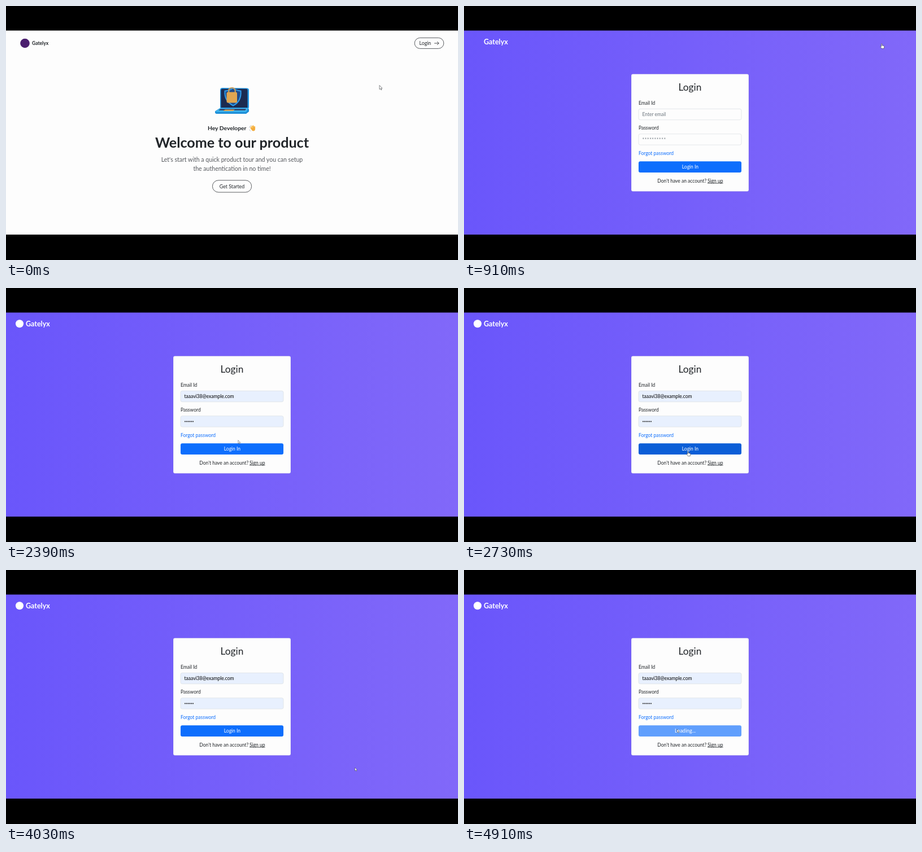
An HTML page for the animation above (5670 ms loop, 800x450 px).

```html
<!DOCTYPE html>
<html lang="en">
<head>
<meta charset="utf-8">
<title>Login demo</title>
<style>
  html, body { margin: 0; height: 100%; overflow: hidden; background: #000; }
  svg { display: block; width: 100vw; height: 100vh; font: 8.5px Lato, "Open Sans", sans-serif; fill: #212529; }
  .bold { font-weight: 700; }
  .mid { text-anchor: middle; }
  .lead { font-size: 10.55px; fill: #55585d; }
  .pill { fill: #fdfdfd; stroke: #33363a; stroke-width: .8; }
  .field { fill: #fdfdfd; stroke: #dee2e6; stroke-width: .8; }
  .hint { fill: #6c757d; }
  .white { fill: #fff; }
  .line { fill: none; stroke-linecap: round; stroke-linejoin: round; }
</style>
</head>
<body>
<svg viewBox="0 0 800 450">
  <defs>
    <linearGradient id="violet">
      <stop stop-color="#6a56fb"/>
      <stop offset="1" stop-color="#8168f9"/>
    </linearGradient>
  </defs>

  <g id="home">
    <rect y="43.5" width="800" height="361.5" fill="#fdfdfd"/>
    <circle cx="33.5" cy="66" r="8.3" fill="#4b1f6f"/>
    <text class="bold" x="46" y="69.2">Gatelyx</text>

    <rect id="loginPill" class="pill" x="723.2" y="56.4" width="51.6" height="19" rx="9.5"/>
    <g id="loginLabel">
      <text x="731.5" y="69.2" font-size="8.8" style="fill:currentColor">Login</text>
      <path class="line" d="M758.5 66H766M763.3 63.3L766 66L763.3 68.7" stroke="currentColor" stroke-width=".8"/>
    </g>

    <g id="laptop">
      <path d="M379 149Q379 145 383 145L426 145.500Q430 145.500 430 149V179Q430 182 427 182H382Q379 182 379 179Z" fill="#2297e4"/>
      <path d="M380.500 149Q380.500 146.800 383 146.800H425Q427.500 146.800 427.500 149V180H380.500Z" fill="#1c2b50"/>
      <path d="M401.500 145.500Q408 150 415.500 150.500Q417 169 402 176.500Q386 168 387.500 150.500Q396 150 401.500 145.500Z" fill="#1f4c8c" stroke="#2e9bea" stroke-width="2"/>
      <path d="M378.500 181H428.500L430 183V187L425 191H372L370 189.500V186.500Z" fill="#1e8fd8"/>
      <path d="M378.500 181H428.500L425 187.500H370.500Z" fill="#41b9f2"/>
      <path d="M379.500 182.300H425L423.500 185H376Z" fill="#34466c"/>
      <path d="M384 186H402L405 183.500H388Z" fill="#d9a353"/>
      <path class="line" d="M394.300 154V150Q394.300 145 399.500 145T405.700 150V154" stroke="#c69a5b" stroke-width="2.200"/>
      <rect x="390.500" y="152.500" width="18.500" height="19" rx="2.500" fill="#e0a651"/>
    </g>

    <text class="bold" x="357" y="220" font-size="10.3">Hey Developer</text>
    <g id="wave" class="line">
      <path d="M433.300 214.500L437 218M435.200 212.800L438.500 216.500M437.500 212.300L439.500 216M433.500 217L436.500 219.500M440.200 214V218" stroke="#f6b545" stroke-width="1.800"/>
      <ellipse cx="437.800" cy="218.200" rx="3" ry="3.200" fill="#f3ab3c"/>
      <path d="M430.800 215.500Q431 212.500 433.500 211.500M433 221.500Q431 221 430.800 219" stroke="#a9b0b8" stroke-width=".7"/>
    </g>
    <text class="bold mid" x="400" y="251" font-size="25.1">Welcome to our product</text>
    <text class="lead mid" x="400" y="276.300">Let's start with a quick product tour and you can setup</text>
    <text class="lead mid" x="400" y="292">the authentication in no time!</text>
    <rect class="pill" x="365.400" y="308.800" width="69.200" height="21.200" rx="10.600"/>
    <text class="mid" x="400" y="322.500" font-size="8.8">Get Started</text>
  </g>

  <g id="login">
    <rect y="43.500" width="800" height="361.500" fill="url(#violet)"/>
    <circle id="mark" class="white" cx="24" cy="63.200" r="7"/>
    <text class="bold white" x="35" y="67.800" font-size="12.5">Gatelyx</text>

    <rect x="296" y="120.500" width="208" height="208" rx="3" fill="#fdfdfd" stroke="#5a48cc" stroke-opacity=".4" stroke-width=".6"/>
    <text class="mid" x="400" y="149.800" font-size="17.3">Login</text>
    <text x="309" y="175">Email Id</text>
    <rect class="field" x="309" y="182.300" width="182" height="19.400" rx="3"/>
    <text x="309" y="219.400">Password</text>
    <rect class="field" x="309" y="226.700" width="182" height="19.400" rx="3"/>
    <g id="empty" class="hint">
      <text x="315.500" y="195">Enter email</text>
      <text x="315.500" y="240.300" letter-spacing=".6">**********</text>
    </g>
    <g id="filled" fill="#000">
      <text x="315.500" y="195">taaavi38@example.com</text>
      <path class="line" d="M317 236.500H332" stroke="#111" stroke-width="1.900" stroke-dasharray="0 2.8"/>
    </g>
    <text x="309" y="263.800" fill="#0d6efd">Forgot password</text>
    <rect id="submit" x="309" y="275.300" width="182" height="19.600" rx="3"/>
    <text id="submitLabel" class="white" y="288.300"></text>
    <text x="342.300" y="312.600">Don't have an account?</text>
    <text x="431" y="312.600" text-decoration="underline">Sign up</text>
  </g>

  <g id="cursor" fill="#fff" stroke="#33363a" stroke-width=".6" stroke-linejoin="round">
    <path id="arrow" d="M0 0V7.200L1.700 5.700L2.900 8.300L4.100 7.700L3 5.300H5Z"/>
    <path id="hand" d="M-1.300 .8Q-.6-.4 .1 .8V3.400L3 4Q4 4.300 3.900 5.500L3.200 8.800H-.7L-3 5.800Q-3.200 4.500-1.300 5.300Z"/>
  </g>
</svg>

<script>
const LOOP = 5670;
const SECOND_PAGE = 910, AUTOFILL = 1030, LOADING = 4060;
const $ = id => document.getElementById(id);
const show = (id, on) => $(id).setAttribute("visibility", on ? "inherit" : "hidden");
const clamp = v => Math.min(1, Math.max(0, v));
const ramp = (t, from, to) => clamp((t - from) / (to - from));
const ease = u => u * u * (3 - 2 * u);
const mix = (a, b, u) => `rgb(${a.map((v, i) => Math.round(v + (b[i] - v) * u))})`;

const PAPER = [253, 253, 253], INK = [33, 37, 41];
const BLUE = [13, 110, 253], HOVER = [11, 94, 215], PALE = [96, 159, 253];

// Cursor moves: start, end, x, y
const start = [661, 140.5];
const moves = [
  [60, 550, 740, 66.5],
  [1270, 1790, 430, 236],
  [2090, 2640, 396.5, 295],
  [2670, 2730, 397, 289],
  [3150, 3390, 617.5, 350],
  [4610, 4910, 377, 282]
];

function cursorAt(t) {
  let [x, y] = start;
  for (const [from, to, endX, endY] of moves) {
    const u = ease(ramp(t, from, to));
    x += (endX - x) * u;
    y += (endY - y) * u;
  }
  return [x, y];
}

const inside = (x, y, top, bottom) => x > 309 && x < 491 && y > top && y < bottom;

function draw(t) {
  const second = t >= SECOND_PAGE, filled = t >= AUTOFILL, loading = t >= LOADING;
  show("home", !second);
  show("login", second);
  show("mark", second && filled);
  show("empty", second && !filled);
  show("filled", second && filled);
  document.querySelectorAll(".field").forEach(f => f.style.fill = filled ? "#e8f0fe" : "#fdfdfd");

  const dark = ramp(t, 440, 640);
  $("loginPill").style.fill = mix(PAPER, INK, dark);
  $("loginLabel").style.color = mix(INK, PAPER, dark);

  const hover = ramp(t, 2420, 2570) - ramp(t, 3195, 3345);
  $("submit").style.fill = t < 4030 ? mix(BLUE, HOVER, hover) : mix(BLUE, PALE, ramp(t, LOADING, 4480));
  $("submitLabel").textContent = loading ? "Loading..." : "Login In";
  $("submitLabel").setAttribute("x", loading ? 373 : 385.8);
  $("submitLabel").setAttribute("font-size", loading ? 9 : 8.5);

  const [x, y] = cursorAt(t);
  const hand = t > 440 && t < 1300 || !loading && inside(x, y, 275, 295);
  const inField = inside(x, y, 182, 202) || inside(x, y, 226, 246);
  $("cursor").setAttribute("transform", `translate(${x} ${y}) scale(${second && !hand ? .8 : 1})`);
  show("cursor", !inField);
  show("hand", hand && !inField);
  show("arrow", !hand && !inField);
}

const begin = performance.now();
function tick() {
  draw((performance.now() - begin) % LOOP);
  requestAnimationFrame(tick);
}
tick();
</script>
</body>
</html>
```
